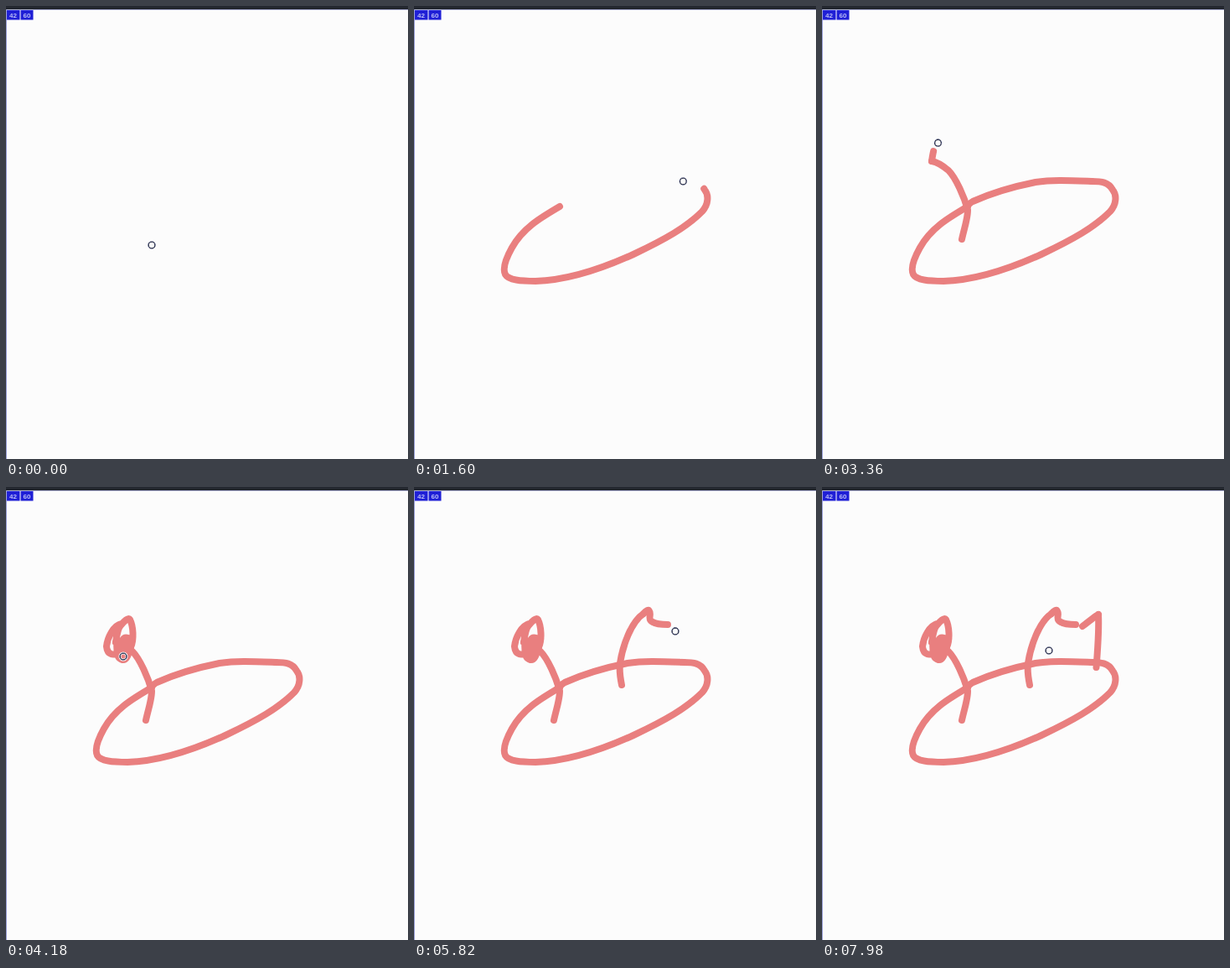
These frames come from a looping animation (480x540 px, 8 s). An HTML page:

```html
<!DOCTYPE html>
<html lang="en">
<head>
<meta charset="utf-8">
<title>Sketch</title>
<style>
  html, body { margin: 0; width: 100%; height: 100%; overflow: hidden; background: #fcfcfc; }
  svg { display: block; width: 480px; height: 540px; }
  path { fill: none; stroke-width: 8; stroke-linecap: round; stroke-linejoin: round; }
  .pen { stroke: #e97f7f; }
  text { font: bold 8px "Liberation Sans", sans-serif; fill: #b9bcf6; text-anchor: middle; }
</style>
</head>
<body>
<svg viewBox="0 0 480 540">
  <rect width="480" height="540" fill="#fcfcfc"/>
  <rect y="4" width="480" height="1" fill="#b4b7dc"/>
  <rect y="4" width="1" height="536" fill="#9da2da"/>
  <rect width="480" height="4" fill="#23272f"/>
  <g fill="#2020d6">
    <rect x="1" y="5" width="15.5" height="11.5"/>
    <rect x="17.5" y="5" width="15" height="11.5"/>
  </g>
  <text x="8.5" y="13.5">42</text>
  <text x="25" y="13.5">60</text>
  <g id="strokes"></g>
  <g id="cursor" fill="none">
    <circle r="4" stroke="#fff" stroke-width="3"/>
    <circle r="3.9" stroke="#20243a" stroke-width="1.4"/>
    <circle r="4.3" stroke="#8b93c4" stroke-width=".9" stroke-dasharray="1.4 2"/>
  </g>
</svg>
<script>
const LOOP = 8000;
const LAG = 40; // ink trails the cursor by this many ms

// start, end, pen down, path followed by the cursor
const moves = [
  [40, 860, 0, "M174 285C200 300 262 354 275 354C270 335 225 300 190 288"],
  [860, 1000, 0, "M190 288L174 239"],
  [1000, 1600, 1, "M174 239C150 253 130 265 117 288C108 304 106 314 109 320C113 327 128 328 145 328C190 327 240 306 262 296C300 278 325 264 344 245C352 236 352 225 347 219C342 210 334 209 322 209"],
  [1600, 1850, 1, "M322 209C295 208 275 207 255 210C230 215 200 224 180 233C176 235 173 239 171 241"],
  [1850, 2440, 0, "M171 241C160 250 150 258 153 262C158 262 168 255 172 247"],
  [2440, 2560, 0, "M172 247L167 278"],
  [2560, 3280, 1, "M167 278C170 264 174 254 174 243C170 228 160 205 151 196C145 191 138 186 131 185"],
  [3280, 4140, 1, "M131 185C133 172 134 168 137 165C141 160 146 155 148 158C152 166 153 182 149 191C146 200 144 207 139 206C131 204 133 195 132 186C131 178 133 170 138 163C128 165 121 180 120 190C121 200 128 202 136 196C144 190 150 182 146 180C140 178 136 184 140 192L142 200L138 205L140 202"],
  [4200, 4580, 0, "M140 202C200 215 295 215 300 225C300 234 270 236 248 236"],
  [4580, 4940, 1, "M248 236C246 226 245 218 246 210C249 190 259 161 274 151"],
  [4940, 5400, 1, "M274 151C277 147 280 146 281 148C284 152 278 158 285 161C290 164 297 164 303 164"],
  [5400, 5820, 0, "M303 164C308 164 314 166 312 172"],
  [5820, 5960, 0, "M312 172L311 166"],
  [5960, 6580, 1, "M311 166C317 162 322 157 327 154"],
  [6660, 6880, 1, "M327 154L330 152"],
  [6880, 6960, 1, "M330 152C331 172 329 195 327.5 215"],
  [6960, 7060, 0, "M327 215L324 225"],
  [7060, 7460, 0, "M324 225C305 222 280 208 269 195"],
  [7460, 7980, 0, "M269 195C280 181 300 182 302 188C298 199 254 201 253 193C257 186 266 191 271 195"]
].map(([start, end, pen, d]) => {
  const path = document.createElementNS("http://www.w3.org/2000/svg", "path");
  path.setAttribute("d", d);
  if (pen) path.setAttribute("class", "pen");
  document.getElementById("strokes").append(path);
  return { start, end, pen, path, length: path.getTotalLength() };
});

const cursor = document.getElementById("cursor");

const travelled = (move, t) =>
  move.length * Math.min(1, Math.max(0, (t - move.start) / (move.end - move.start)));

function render(t) {
  let current = moves[0];
  for (const move of moves) {
    if (t >= move.start) current = move;
    if (!move.pen) continue;
    const inked = travelled(move, t - LAG);
    move.path.style.visibility = inked > 0 ? "visible" : "hidden";
    move.path.style.strokeDasharray = `${inked} 9999`;
  }
  const { x, y } = current.path.getPointAtLength(travelled(current, t));
  cursor.setAttribute("transform", `translate(${x} ${y})`);
}

const origin = performance.now();
function tick() {
  render((performance.now() - origin) % LOOP);
  requestAnimationFrame(tick);
}
tick();
</script>
</body>
</html>
```
